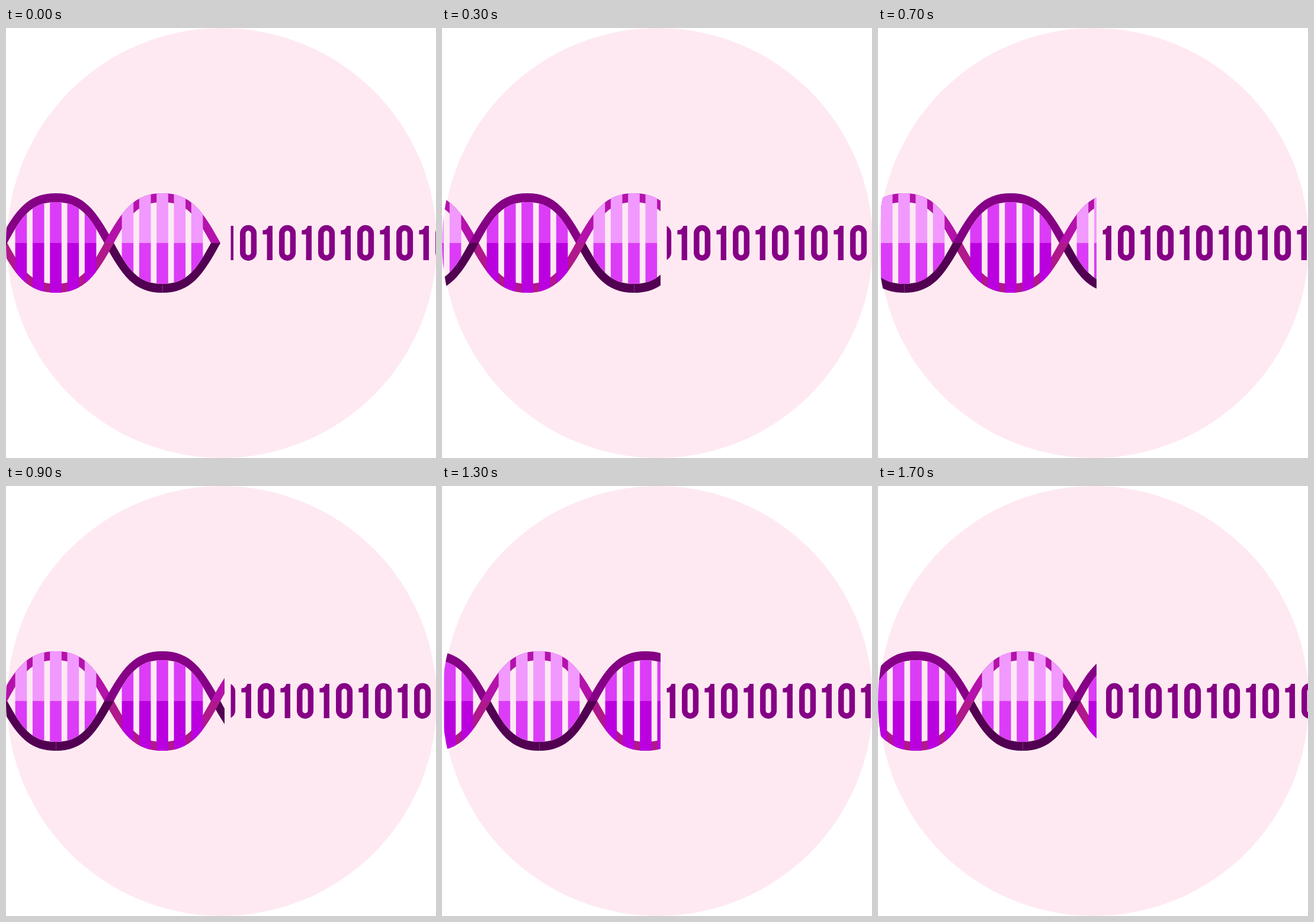
An HTML page with a canvas for the animation above (1800 ms loop, 726 px wide and 726 px high).

```html
<!DOCTYPE html>
<html lang="en">
<head>
<meta charset="utf-8">
<title>DNA to binary</title>
<style>
  html, body { margin: 0; width: 100%; height: 100%; overflow: hidden; background: #fff; }
  canvas { display: block; width: 726px; height: 726px; }
</style>
</head>
<body>
<canvas id="stage" width="726" height="726"></canvas>
<script>
const ctx = document.getElementById('stage').getContext('2d');
const AXIS = 363, STEP_MS = 100, STEPS = 18;
const BACKGROUND = '#fee9f2', PURPLE = '#850085';

// Quarter curves from the axis to the apex: [foot x, x1, y1, x2, apex height]
const OUTER = [98, 68, 55, 48, 84];
const INNER = [82, 58, 44, 42, 69];

const LIGHT = {
  top: '#b412ab', bottom: '#520052',
  barTop: '#f199ff', barBottom: '#dc3cf8',
  topEdge: OUTER, bottomEdge: INNER
};
const DARK = {
  top: PURPLE, bottom: '#b0188b',
  barTop: '#dc3cf8', barBottom: '#bb00e0',
  topEdge: INNER, bottomEdge: OUTER
};

function rise(cx, sx, sy, [foot, x1, y1, x2, h]) {
  ctx.bezierCurveTo(cx + sx * x1, AXIS + sy * y1, cx + sx * x2, AXIS + sy * h, cx, AXIS + sy * h);
}

function fall(cx, sx, sy, [foot, x1, y1, x2, h]) {
  ctx.bezierCurveTo(cx + sx * x2, AXIS + sy * h, cx + sx * x1, AXIS + sy * y1, cx + sx * foot, AXIS);
}

function strandQuarter(cx, sx, sy, color) {
  ctx.beginPath();
  ctx.moveTo(cx + sx * OUTER[0], AXIS);
  rise(cx, sx, sy, OUTER);
  ctx.lineTo(cx, AXIS + sy * INNER[4]);
  fall(cx, sx, sy, INNER);
  ctx.closePath();
  ctx.fillStyle = color;
  ctx.fill();
}

function bars(cx, sy, edge, color) {
  ctx.save();
  ctx.beginPath();
  ctx.moveTo(cx - edge[0], AXIS);
  rise(cx, -1, sy, edge);
  fall(cx, 1, sy, edge);
  ctx.closePath();
  ctx.clip();
  ctx.fillStyle = color;
  for (let i = -2; i <= 2; i++) {
    ctx.fillRect(cx + i * 29.3 - 9.8, sy < 0 ? AXIS - 84 : AXIS, 19.6, 84);
  }
  ctx.restore();
}

function helix(step) {
  ctx.save();
  ctx.beginPath();
  ctx.arc(363, AXIS, 363, 0, Math.PI * 2);
  ctx.clip();
  ctx.beginPath();
  ctx.rect(0, 270, 369, 186);
  ctx.clip();

  const lenses = [];
  for (let cx = 264 + step * 20, k = 0; cx > -100; cx -= 180, k++) {
    lenses.push({ cx, look: k % 2 ? DARK : LIGHT });
  }
  // Quarters passing behind a crossing first, then those in front
  for (const { cx, look } of lenses) {
    strandQuarter(cx, 1, -1, look.top);
    strandQuarter(cx, -1, 1, look.bottom);
  }
  for (const { cx, look } of lenses) {
    strandQuarter(cx, -1, -1, look.top);
    strandQuarter(cx, 1, 1, look.bottom);
  }
  for (const { cx, look } of lenses) {
    bars(cx, -1, look.topEdge, look.barTop);
    bars(cx, 1, look.bottomEdge, look.barBottom);
    if (look === LIGHT) {
      ctx.fillStyle = 'rgba(254, 233, 242, 0.22)';
      ctx.fillRect(cx, AXIS + INNER[4], 1, 15);
    }
  }
  ctx.restore();
}

function zero(x) {
  ctx.beginPath();
  ctx.roundRect(x + 4.8, 337.6, 18.6, 50.6, 9.2);
  ctx.stroke();
}

function one(x) {
  ctx.beginPath();
  ctx.moveTo(x, 341.5);
  ctx.quadraticCurveTo(x + 8, 341.5, x + 10, 334);
  ctx.lineTo(x + 16.6, 334);
  ctx.lineTo(x + 16.6, 392);
  ctx.lineTo(x + 7.2, 392);
  ctx.lineTo(x + 7.2, 348.5);
  ctx.lineTo(x, 348.5);
  ctx.closePath();
  ctx.fill();
}

function binary(step) {
  const phase = step % 6;
  const shift = phase * 10 + Math.max(0, phase - 3) * 3;
  ctx.save();
  ctx.beginPath();
  ctx.rect(379.5, 320, 347, 86);
  ctx.clip();
  ctx.fillStyle = ctx.strokeStyle = PURPLE;
  ctx.lineWidth = 9.5;
  for (let x = 329 + shift - 66; x < 760; x += 66) {
    one(x - 27.6);
    zero(x);
  }
  ctx.restore();
}

function draw(now) {
  const step = Math.floor(now / STEP_MS) % STEPS;
  ctx.fillStyle = '#fff';
  ctx.fillRect(0, 0, 726, 726);
  ctx.fillStyle = BACKGROUND;
  ctx.beginPath();
  ctx.arc(364.5, AXIS, 363, 0, Math.PI * 2);
  ctx.fill();
  helix(step);
  binary(step);
  requestAnimationFrame(draw);
}

draw(0);
</script>
</body>
</html>
```
